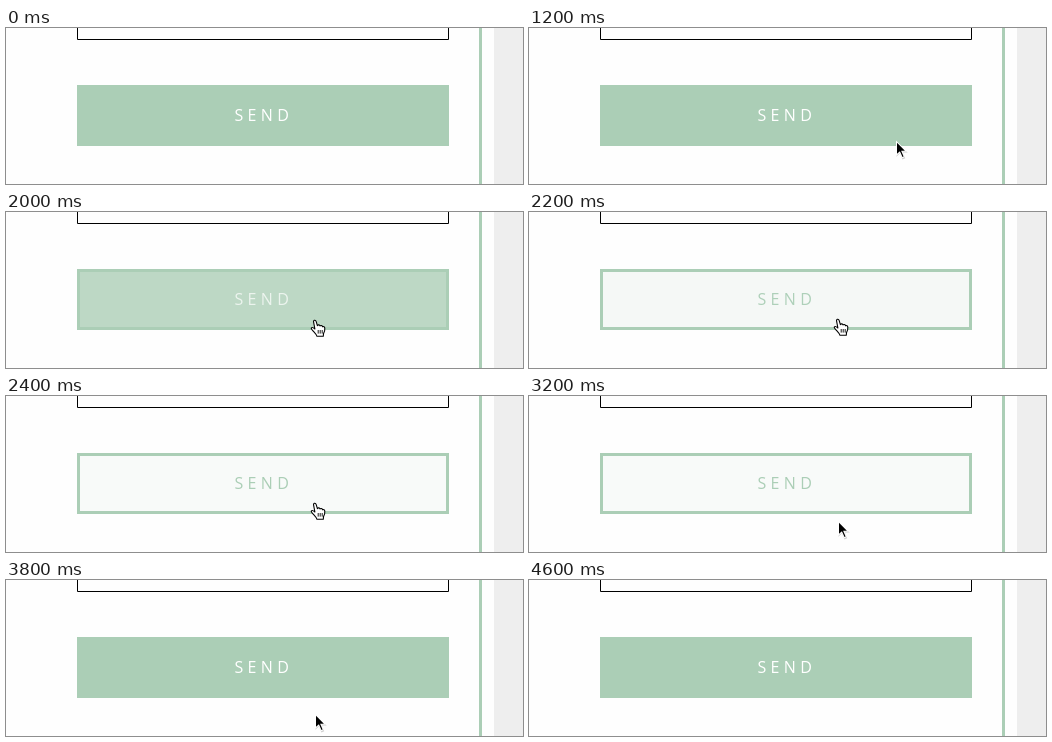
Write an HTML page that moves like this. It is 517x156 px and loops after 4.8 s.

```html
<!DOCTYPE html>
<html lang="en">
<head>
<meta charset="utf-8">
<title>Send button</title>
<style>
html, body { margin: 0; width: 100%; height: 100%; overflow: hidden; background: #fefefe; }
svg { display: block; }
text { font: 400 16px "Open Sans", "Noto Sans", sans-serif; letter-spacing: 4.4px; }
</style>
</head>
<body>
<svg width="517" height="156" viewBox="0 0 517 156">
  <rect width="517" height="156" fill="#fefefe"/>
  <rect x="488" width="29" height="156" fill="#eee"/>
  <rect x="473" width="3" height="156" fill="#abceb6"/>
  <path d="M71.5 -1V11.5H442.5V-1" fill="none" stroke="#000"/>
  <rect x="71" y="57" width="372" height="61" fill="#abceb6"/>
  <rect id="fill" x="74" y="60" width="366" height="55"/>
  <text id="label" x="228.4" y="93">SEND</text>
  <g id="arrow">
    <path d="M1 .5V16L4.6 12.8L7.2 18.6L10 17.4L7.5 11.8H12.4Z" fill="#000" opacity=".18" transform="translate(.3 .8)"/>
    <path d="M1 .5V16L4.6 12.8L7 18.2L9.8 17L7.5 11.6H12.2Z" fill="#fff"/>
    <path d="M2 2.8V13.8L4.9 11.2L7.5 17L8.6 16.5L6.1 10.7H9.9Z" fill="#000"/>
  </g>
  <g id="hand" stroke="#000" stroke-width="1.1" stroke-linejoin="round">
    <path fill="#fff" d="M3.6 3.2C3 1.1 5.6 .5 6.2 2.6L7.4 6.6C7.8 5.6 9.8 5.6 10 7C10.6 6.2 12.3 6.4 12.5 7.8C13.5 7.2 14.8 7.8 14.8 9.2C15 11.5 14.5 13 13.5 14.6L13.3 17.3H7C6.6 15.4 4.6 13.6 3 11.8C1.8 10.6 .8 9.6 1.4 8.8C2.2 8 3.6 8.8 4.9 10Z"/>
    <path fill="none" stroke-width=".9" d="M8.2 11V14.6M10.2 11V14.6M12.2 11V14.6"/>
  </g>
</svg>
<script>
const LOOP = 4800, STEP = 200;
const GREEN = [171, 206, 182], PALE = [248, 250, 249], WHITE = [255, 255, 255];

// [start ms, pointer shape, x, y]
const pointer = [
  [0, ""], [200, "arrow", 391, 154], [400, "arrow", 356, 128], [600, "arrow", 348, 114],
  [800, "arrow", 347, 109], [1000, "arrow", 347, 108], [1200, "arrow", 366, 112],
  [1400, ""], [1600, "arrow", 308, 123], [1800, "hand", 304, 114],
  [2000, "hand", 304, 107], [2200, "hand", 304, 106], [2800, "hand", 304, 109],
  [3000, "hand", 304, 119], [3200, "arrow", 308, 124], [3400, "arrow", 308, 129],
  [3600, "arrow", 308, 132], [3800, "arrow", 308, 133], [4200, "arrow", 312, 134],
  [4400, "arrow", 396, 155], [4600, ""]
];
// [start ms, hover amount]
const hover = [[0, 0], [2000, .23], [2200, .96], [2400, 1], [3600, .38], [3800, 0]];

const el = id => document.getElementById(id);
const at = (keys, t) => keys.findLast(k => k[0] <= t);
const mix = (a, b, k) => `rgb(${a.map((v, i) => Math.round(v + (b[i] - v) * k))})`;

function draw(time) {
  const t = Math.floor(time % LOOP / STEP) * STEP;
  const amount = at(hover, t)[1];
  el("fill").setAttribute("fill", mix(GREEN, PALE, amount));
  el("label").setAttribute("fill", mix(WHITE, GREEN, amount));

  const [, shape, x, y] = at(pointer, t);
  for (const id of ["arrow", "hand"]) {
    el(id).setAttribute("display", id === shape ? "inline" : "none");
    if (id === shape) el(id).setAttribute("transform", `translate(${x} ${y})`);
  }
}

const start = performance.now();
function tick() {
  draw(performance.now() - start);
  requestAnimationFrame(tick);
}
tick();
</script>
</body>
</html>
```
